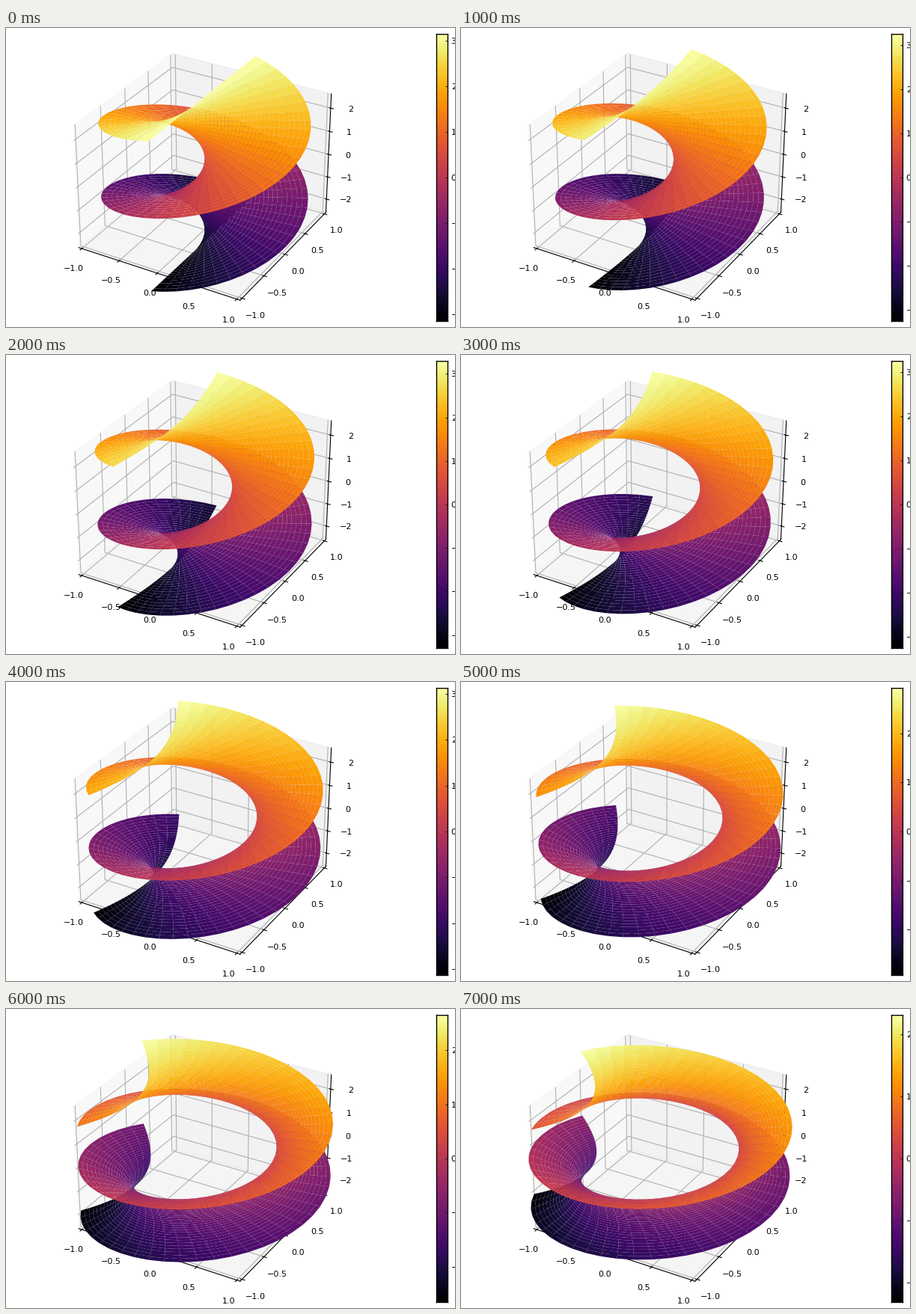
Write a matplotlib script that moves like this. It is 600 by 400 pixels and loops after 8 s.

```python
import numpy as np
import matplotlib.pyplot as plt
from matplotlib.animation import FuncAnimation

W, H, DPI = 600, 400, 100
STEPS = 8
MARGIN = 25 / 24        # panes reach a little past the outer ticks

plt.rcParams.update({"font.family": "DejaVu Sans", "font.size": 8})
fig = plt.figure(figsize=(W / DPI, H / DPI), dpi=DPI, facecolor="white")


def px_rect(x, y, w, h):
    return [x / W, y / H, w / W, h / H]


# 3D box
ax = fig.add_axes(px_rect(68.2, 11.6, 384, 384), projection="3d")
ax.patch.set_visible(False)
ax.view_init(elev=30, azim=-60)
ax.set_box_aspect((4, 4, 3))
ax.set_xlim(-MARGIN, MARGIN)
ax.set_ylim(-MARGIN, MARGIN)
ax.set_zlim(-2.5 * MARGIN, 2.5 * MARGIN)
ax.set_xticks(np.linspace(-1, 1, 5))
ax.set_yticks(np.linspace(-1, 1, 5))
ax.set_zticks(range(-2, 3))

# colour bar
bar = fig.add_axes(px_rect(574.8, 8, 15, 384))
ramp = bar.imshow(np.linspace(0, 1, 256)[:, None], cmap="inferno",
                  origin="lower", aspect="auto")
bar.set_xticks([])
bar.yaxis.tick_right()
bar.tick_params(axis="y", direction="in", length=2.5, width=0.6)
for spine in bar.spines.values():
    spine.set_linewidth(1)

u, v = np.meshgrid(np.linspace(-np.pi, np.pi, 50), np.linspace(-1, 1, 50))
surface = None


def bend(theta):
    """Helicoid at theta = 0, catenoid at theta = pi / 2."""
    c, s = np.cos(theta), np.sin(theta)
    x = c * np.sinh(v) * np.sin(u) + s * np.cosh(v) * np.cos(u)
    y = -c * np.sinh(v) * np.cos(u) + s * np.cosh(v) * np.sin(u)
    return x, y, c * u + s * v


def update(i):
    global surface
    if surface is not None:
        surface.remove()
    x, y, z = bend(i * np.pi / 20)
    top = z.max()
    surface = ax.plot_surface(x, y, z, rstride=1, cstride=1, cmap="inferno",
                              vmin=-top, vmax=top, linewidth=0)
    ramp.set_extent((0, 1, -top, top))
    bar.set_ylim(-top, top)
    bar.set_yticks(range(-int(top), int(top) + 1))
    return []


anim = FuncAnimation(fig, update, frames=STEPS, init_func=lambda: [],
                     interval=1000, repeat=True, repeat_delay=0, blit=False)
plt.show()
```
